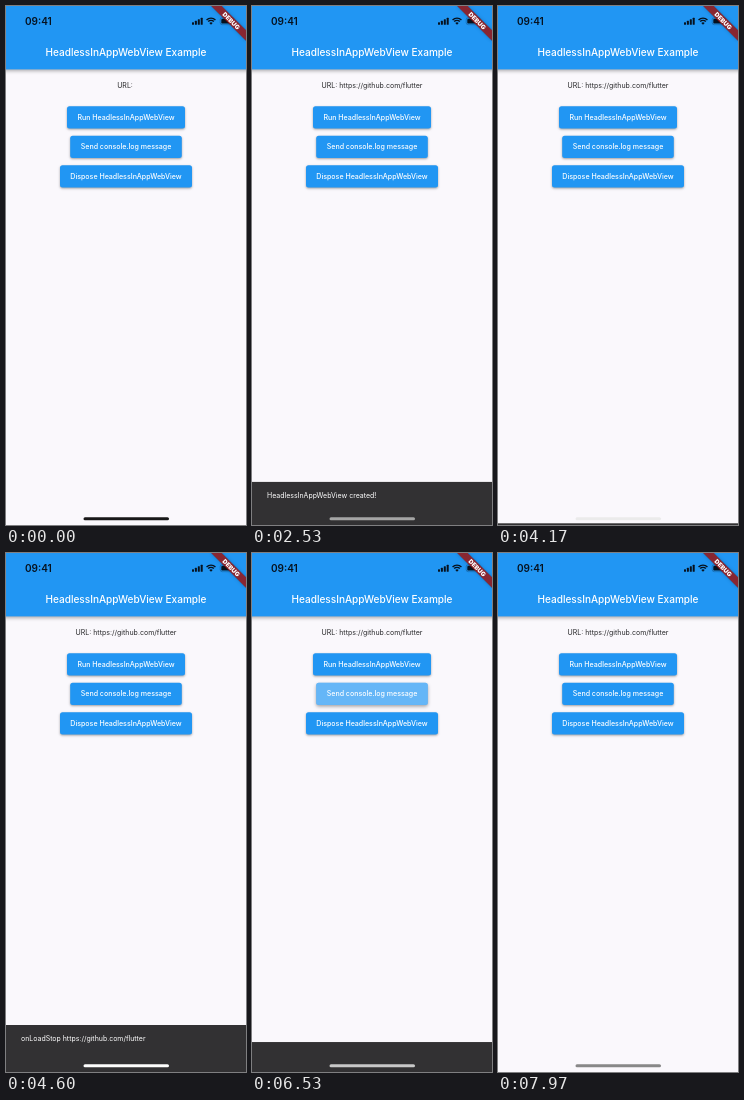
An HTML page with a canvas for the animation above (8 s loop, 240 by 519 pixels).

```html
<!DOCTYPE html>
<html lang="en">
<head>
<meta charset="utf-8">
<style>
  html, body { margin: 0; width: 100%; height: 100%; overflow: hidden; background: #faf8fc; }
  canvas { display: block; width: 240px; height: 519px; }
</style>
</head>
<body>
<canvas id="stage"></canvas>
<script>
const W = 240, H = 519, LOOP = 8000;
const BLUE = '#2196f3', PAPER = '#faf8fc', SNACK = '#323133', INK = '#06121f';
const FONT = 'Inter, sans-serif';
const PAGE = 'https://github.com/flutter';

const canvas = document.getElementById('stage');
const ctx = canvas.getContext('2d');
const dpr = window.devicePixelRatio || 1;
canvas.width = W * dpr;
canvas.height = H * dpr;

const buttons = [
  { label: 'Run HeadlessInAppWebView', x: 61, y: 100.2, w: 118, down: 1110, up: 1165 },
  { label: 'Send console.log message', x: 64.2, y: 129.7, w: 111.6, down: 6230, up: 6410 },
  { label: 'Dispose HeadlessInAppWebView', x: 54, y: 159.2, w: 132 }
];
const BUTTON_H = 22.2;

const SLIDE = 250, SNACK_H = 47;
const snacks = [
  { text: 'HeadlessInAppWebView created!', from: 1204, leave: 2446 },
  { text: 'onLoadStart ' + PAGE, from: 2700, leave: 3950 },
  { text: 'onLoadStop ' + PAGE, from: 4200, leave: 5450 },
  { text: 'Console Message: Here is the message!', from: 6428, leave: 7678 }
];

// Home indicator brightness: [time, grey]
const homeTones = [
  [0, 24], [1200, 24], [1370, 95], [2530, 165], [3470, 205], [4600, 254],
  [5500, 254], [5750, 155], [6420, 155], [6530, 200], [7700, 235], [7970, 136], [LOOP, 130]
];

const clamp = v => Math.max(0, Math.min(1, v));
const mix = (a, b, k) => a + (b - a) * k;

// cubic-bezier(.4, 0, .2, 1)
function fastOutSlowIn(x) {
  let lo = 0, hi = 1;
  for (let i = 0; i < 20; i++) {
    const s = (lo + hi) / 2, r = 1 - s;
    if (1.2 * s * r * r + 0.6 * s * s * r + s * s * s < x) lo = s; else hi = s;
  }
  return lo * lo * (3 - 2 * lo);
}

function track(points, t) {
  const i = Math.max(1, points.findIndex(p => p[0] >= t));
  const [t0, a] = points[i - 1], [t1, b] = points[i];
  return mix(a, b, clamp((t - t0) / (t1 - t0)));
}

function text(str, x, y, size, weight, color, align = 'center') {
  ctx.font = `${weight} ${size}px ${FONT}`;
  ctx.textAlign = align;
  ctx.fillStyle = color;
  ctx.fillText(str, x, y);
}

function box(x, y, w, h, r, color) {
  ctx.beginPath();
  ctx.roundRect(x, y, w, h, r);
  ctx.fillStyle = color;
  ctx.fill();
}

function shadow(color, blur, dy) {
  ctx.shadowColor = color;
  ctx.shadowBlur = blur * dpr;
  ctx.shadowOffsetY = dy * dpr;
}

function drawAppBar() {
  ctx.save();
  shadow('rgba(0,0,0,.32)', 3.5, 1.3);
  ctx.fillStyle = BLUE;
  ctx.fillRect(-10, -10, W + 20, 73.4);
  ctx.restore();
  text('HeadlessInAppWebView Example', 120, 49.8, 10.05, 500, '#fff');
}

function drawStatus() {
  text('09:41', 19, 19, 10, 600, INK, 'left');
  for (let i = 0; i < 4; i++) {
    const h = 2.5 + i * 1.5;
    box(186 + i * 2.9, 18.7 - h, 2, h, 0.5, INK);
  }
  // Wi-Fi fan
  const a0 = -Math.PI * 0.75, a1 = -Math.PI * 0.25;
  ctx.strokeStyle = INK;
  ctx.lineWidth = 1.4;
  for (const r of [6.3, 4]) {
    ctx.beginPath();
    ctx.arc(205, 18.4, r, a0, a1);
    ctx.stroke();
  }
  ctx.beginPath();
  ctx.moveTo(205, 18.7);
  ctx.arc(205, 18.7, 2.4, a0, a1);
  ctx.fillStyle = INK;
  ctx.fill();
  // Battery
  ctx.beginPath();
  ctx.roundRect(214.2, 11.7, 14, 7, 2);
  ctx.strokeStyle = 'rgba(6,18,31,.4)';
  ctx.lineWidth = 0.6;
  ctx.stroke();
  box(215.3, 12.8, 11.8, 4.8, 1.2, INK);
  box(228.9, 14, 0.8, 2.4, 0.4, 'rgba(6,18,31,.4)');
}

function drawBanner() {
  ctx.save();
  ctx.translate(W, 0);
  ctx.rotate(Math.PI / 4);
  ctx.save();
  shadow('rgba(0,0,0,.5)', 3.7, 0);
  ctx.fillStyle = 'rgba(0,0,0,.45)';
  ctx.fillRect(-24.6, 17.2, 49.2, 7.4);
  ctx.restore();
  ctx.fillStyle = 'rgba(183,28,28,.72)';
  ctx.fillRect(-24.6, 17.2, 49.2, 7.4);
  text('DEBUG', 0, 23.2, 6.2, 900, '#fff');
  ctx.restore();
}

function drawButton({ label, x, y, w, down, up }, t) {
  const active = down !== undefined && t >= down;
  let press = 0;
  if (active) {
    press = clamp((Math.min(t, up) - down) / 200);
    press *= 1 - clamp((t - up) / 200);
  }
  ctx.save();
  shadow('rgba(0,0,0,.36)', mix(2.4, 6, press), mix(1, 3, press));
  box(x, y, w, BUTTON_H, 2.5, BLUE);
  ctx.restore();

  if (active && t < up + 375) {
    ctx.save();
    ctx.beginPath();
    ctx.roundRect(x, y, w, BUTTON_H, 2.5);
    ctx.clip();
    ctx.fillStyle = `rgba(255,255,255,${0.24 * press})`;
    ctx.fillRect(x, y, w, BUTTON_H);
    // Ripple spreads slowly while held, then quickly after release
    const held = clamp((Math.min(t, up) - down) / 1000);
    const grow = mix(held, 1, fastOutSlowIn(clamp((t - up) / 160)));
    const alpha = 0.24 * clamp((t - down) / 75) * (1 - clamp((t - up - 225) / 150));
    ctx.beginPath();
    ctx.arc(x + w / 2, y + BUTTON_H / 2, mix(0.3, 1, grow) * w * 0.52, 0, Math.PI * 2);
    ctx.fillStyle = `rgba(255,255,255,${alpha})`;
    ctx.fill();
    ctx.restore();
  }
  text(label, x + w / 2, y + 13.5, 7.05, 500, '#fff');
}

function drawSnack({ text: message, from, leave }, t) {
  if (t < from || t >= leave + SLIDE) return;
  const progress = t < leave ? clamp((t - from) / SLIDE) : 1 - (t - leave) / SLIDE;
  const top = H - SNACK_H * fastOutSlowIn(progress);
  ctx.fillStyle = SNACK;
  ctx.fillRect(0, top, W, SNACK_H + 1);
  ctx.save();
  ctx.globalAlpha = t < leave ? fastOutSlowIn(clamp((progress - 0.72) / 0.28)) : 1;
  text(message, 15, top + 15.8, 6.98, 400, '#fff', 'left');
  ctx.restore();
}

function draw(t) {
  ctx.setTransform(dpr, 0, 0, dpr, 0, 0);
  ctx.fillStyle = PAPER;
  ctx.fillRect(0, 0, W, H);
  drawAppBar();
  drawStatus();
  drawBanner();
  text('URL: ' + (t < 1300 ? '' : PAGE), 120, 82.4, 7.03, 400, '#2b2b2d');
  buttons.forEach(b => drawButton(b, t));
  snacks.forEach(s => drawSnack(s, t));
  const tone = Math.round(track(homeTones, t));
  box(77.5, 511.2, 85.5, 3, 1.5, `rgb(${tone},${tone},${tone})`);
}

function loop() {
  draw(performance.now() % LOOP);
  requestAnimationFrame(loop);
}
loop();
</script>
</body>
</html>
```
